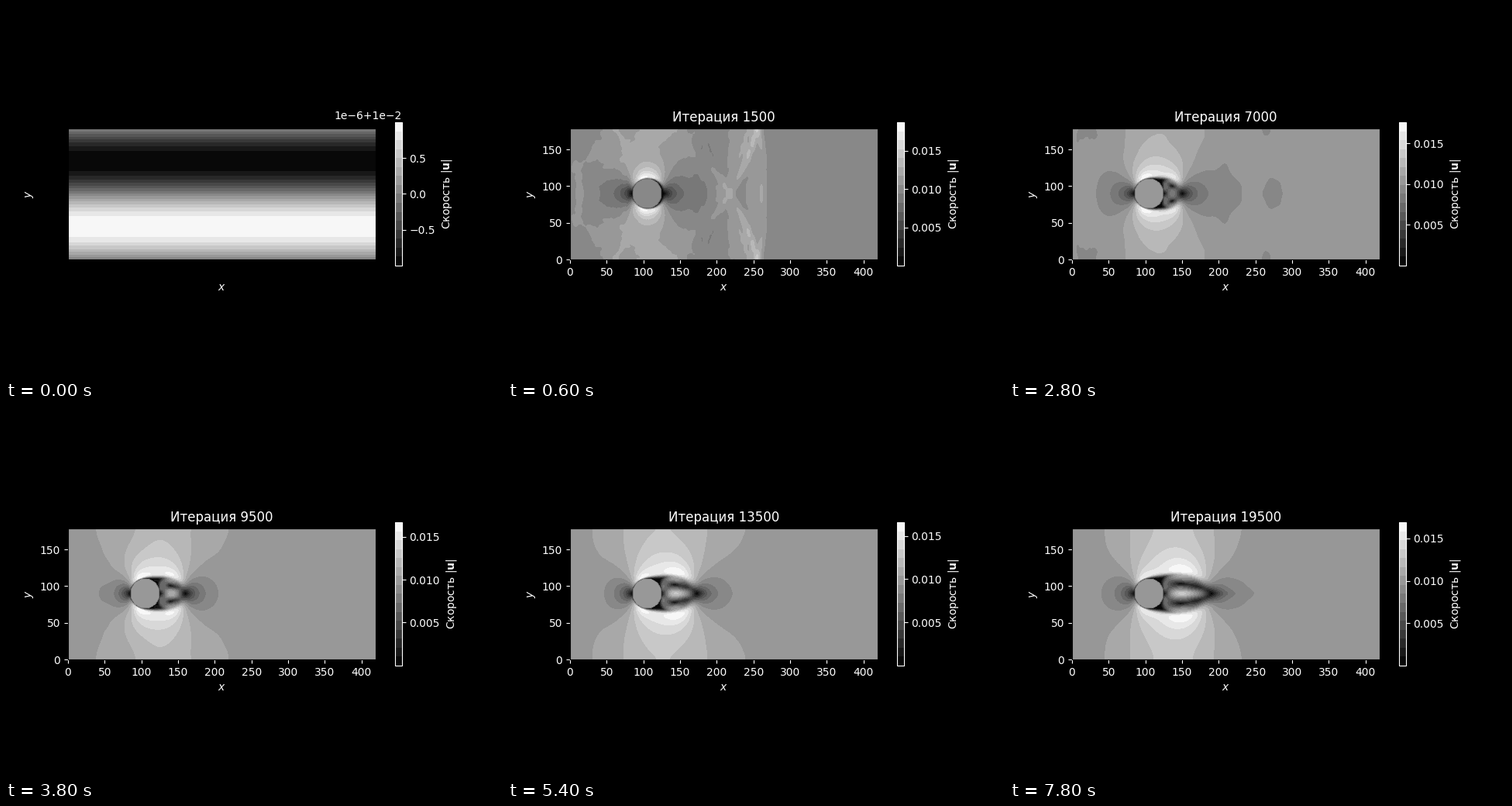
A matplotlib script that plays this animation: 640x480 px, repeating every 8 s.

```python
import numpy as np
import matplotlib.pyplot as plt
from matplotlib.animation import FuncAnimation

# Lattice Boltzmann (D2Q9) flow past a cylinder. The flow is symmetric about
# the centre line, so only the upper half is solved, with one ghost row per side.
NX, NY = 420, 180
CX, CY, R = NX // 4, NY // 2, NY // 9
LX, LY = 320, CY + 3
RE = 220
U0 = 0.025                      # lattice speed used by the solver
U_SHOWN = 0.01
FRAMES, ITERS = 40, 500
STEPS = round(ITERS * U_SHOWN / U0)
OMEGA = 1 / (3 * U0 * R / RE + 0.5)

# Opposite directions are stored next to each other.
C = [(0, 0), (1, 0), (-1, 0), (0, 1), (0, -1), (1, 1), (-1, -1), (1, -1), (-1, 1)]
W = [4 / 9] + [1 / 9] * 4 + [1 / 36] * 4
OPP = [0, 2, 1, 4, 3, 6, 5, 8, 7]
MIRROR = [0, 1, 2, 4, 3, 7, 8, 5, 6]


def moments(f):
    right, left = f[1] + f[5] + f[7], f[2] + f[6] + f[8]
    rho = f[0] + f[3] + f[4] + right + left
    ux = (right - left) / rho
    uy = (f[3] - f[4] + f[5] - f[6] + f[8] - f[7]) / rho
    return rho, ux, uy


def open_ends(f):
    for i in (2, 6, 8):
        f[i, -1] = f[i, -2]
    a = f[:, 0]
    rho = (a[0] + a[3] + a[4] + 2 * (a[2] + a[6] + a[8])) / (1 - U0)
    for i in (1, 5, 7):
        a[i] = a[i + 1] + 6 * W[i] * U0 * rho


def collide(f, rho, ux, uy):
    base = 1 - 1.5 * (ux * ux + uy * uy)
    f *= 1 - OMEGA
    f[0] += OMEGA * W[0] * rho * base
    speeds = {1: ux, 3: uy, 5: ux + uy, 7: ux - uy}
    for i, cu in speeds.items():
        wr = (OMEGA * W[i]) * rho
        even = cu * cu
        even *= 4.5
        even += base
        even *= wr
        wr *= cu
        wr *= 3
        f[i] += even
        f[i] += wr
        f[i + 1] += even
        f[i + 1] -= wr


def stream(f, out):
    src, dst = f.reshape(9, -1), out.reshape(9, -1)
    for i, (cx, cy) in enumerate(C):
        s = cx * LY + cy
        if s > 0:
            dst[i, s:] = src[i, :-s]
        elif s < 0:
            dst[i, :s] = src[i, -s:]
        else:
            dst[i] = src[i]


def full_speed(ux, uy):
    half = np.hypot(ux, uy).astype(float) * (U_SHOWN / U0)
    rows = 1 + abs(np.arange(NY) - CY)
    return np.pad(half[:, rows].T, ((0, 0), (0, NX - LX)), mode="edge")


def simulate():
    x, y = np.meshgrid(np.arange(LX), np.arange(LY) - 1, indexing="ij")
    solid = np.flatnonzero((x - CX) ** 2 + y ** 2 < R * R)
    f = np.empty((9, LX, LY), np.float32)
    for i, (cx, _) in enumerate(C):
        f[i] = W[i] * (1 + 3 * cx * U0 + 4.5 * (cx * U0) ** 2 - 1.5 * U0 ** 2)
    g = f.copy()
    wave = U_SHOWN * (1 + 1e-4 * np.sin(2 * np.pi * np.arange(NY) / (NY - 1)))
    fields = [np.repeat(wave[:, None], NX, axis=1)]
    for n in range(STEPS * (FRAMES - 1) + 1):
        open_ends(f)
        rho, ux, uy = moments(f)
        if n and n % STEPS == 0:
            fields.append(full_speed(ux, uy))
        back = f.reshape(9, -1)[:, solid][OPP]
        collide(f, rho, ux, uy)
        f.reshape(9, -1)[:, solid] = back
        f[:, :, 0] = f[MIRROR, :, 2]
        f[:, :, -1] = f[MIRROR, :, -3]
        stream(f, g)
        f, g = g, f
    return fields


plt.style.use("dark_background")
plt.rcParams["font.family"] = "DejaVu Sans"
fig = plt.figure(figsize=(6.4, 4.8), dpi=100)
fields = simulate()


def draw(n):
    fig.clear()
    ax = fig.add_subplot()
    z = fields[n]
    cs = ax.contourf(z, levels=np.linspace(z.min(), z.max(), 17), cmap="gray")
    ax.set_aspect("equal")
    ax.spines[:].set_color("black")
    ax.set_xlabel("$x$")
    ax.set_ylabel("$y$")
    if n:
        ax.set_title(f"Итерация {n * ITERS}")
    else:
        ax.tick_params(colors="black")
    bar = fig.colorbar(cs, ax=ax, shrink=0.5, label=r"Скорость $|\mathbf{u}|$")
    bar.locator = plt.MaxNLocator(4, steps=[1, 5, 10])
    bar.update_ticks()


anim = FuncAnimation(fig, draw, frames=FRAMES, interval=200, repeat=True)
plt.show()
```
